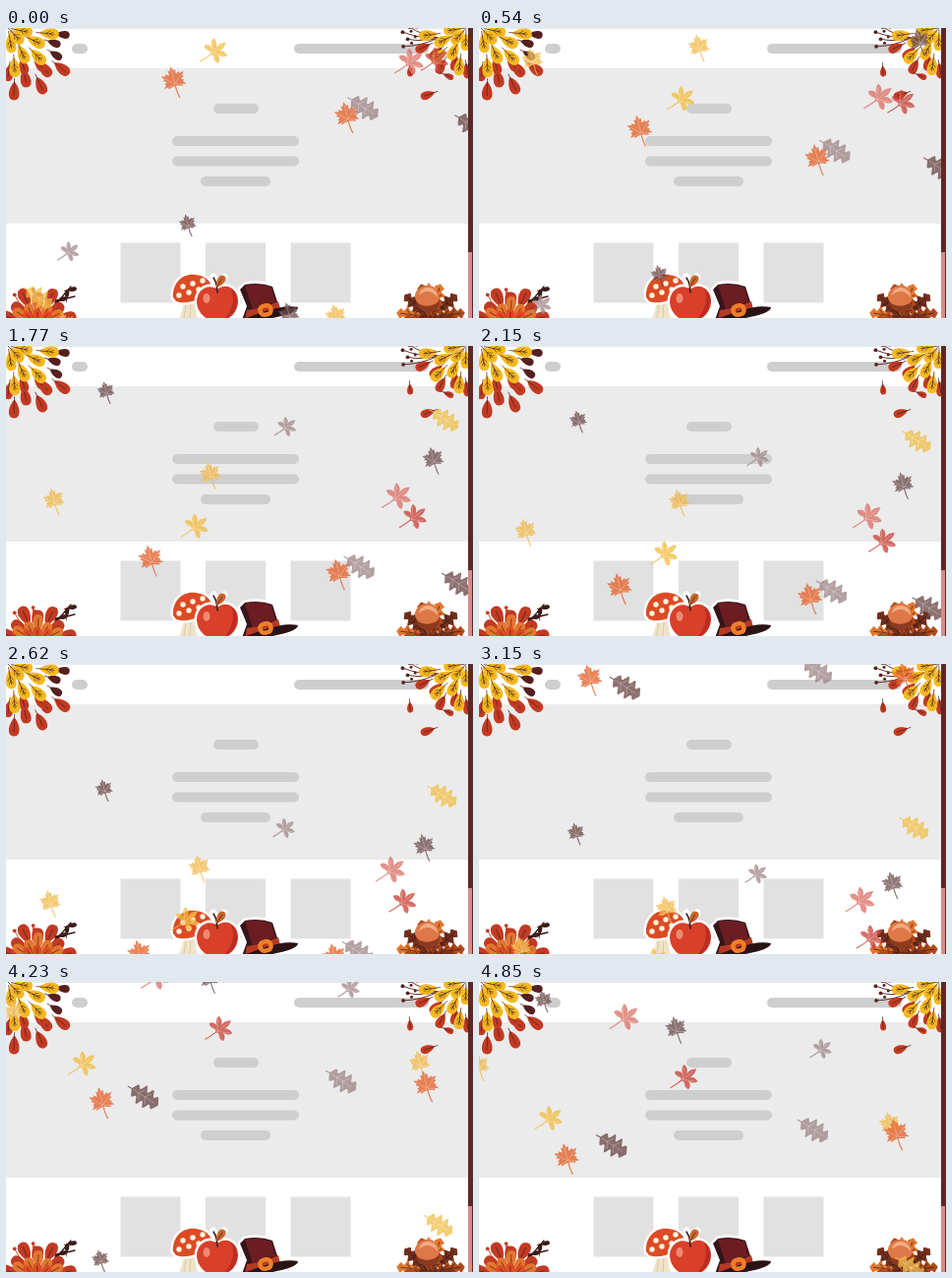
These frames come from a looping animation (475x295 px, 4.92 s). An HTML page with a canvas:

```html
<!DOCTYPE html>
<html lang="en">
<head>
<meta charset="utf-8">
<title>Autumn leaves</title>
<style>
html, body { margin: 0; width: 100%; height: 100%; overflow: hidden; background: #fff; }
canvas { display: block; }
</style>
</head>
<body>
<canvas id="stage" width="475" height="295"></canvas>
<script>
const W = 475, H = 295, LOOP = 4920, STEPS = 64;
const stage = document.getElementById('stage').getContext('2d');

const RED = '#c23a23', BRICK = '#dc4b25', YELLOW = '#f5b921', MAROON = '#56201f';
const ORANGE = '#e2762f', RUST = '#b04a1c', INK = '#351a18';

function fill(c, d, color) {
  c.fillStyle = color;
  c.fill(new Path2D(d));
}

function line(c, d, color, width = 1) {
  c.strokeStyle = color;
  c.lineWidth = width;
  c.lineCap = c.lineJoin = 'round';
  c.stroke(new Path2D(d));
}

function dot(c, x, y, r, color, ry = r) {
  c.fillStyle = color;
  c.beginPath();
  c.ellipse(x, y, r, ry, 0, 0, 7);
  c.fill();
}

function pill(c, x, y, w) {
  c.fillStyle = '#cecece';
  c.beginPath();
  c.roundRect(x, y, w, 10, 5);
  c.fill();
}

// ---- Falling leaves -------------------------------------------------------

// Angles are measured clockwise from straight up.
const polar = (angle, r) => `${Math.sin(angle) * r} ${-Math.cos(angle) * r}`;

// Five lobes around a centre; "lobe" gives the segments of one.
function lobed(spread, lobe) {
  let d = 'M0 .3';
  for (let i = -2; i <= 2; i++) d += lobe(i * spread, 1 - 0.09 * Math.abs(i));
  return new Path2D(d + 'Z');
}

const toothedLobe = (a, r) => [[-.46, .5], [-.32, .8 * r], [-.19, .7 * r], [0, r], [.19, .7 * r], [.32, .8 * r], [.46, .5]]
  .map(([turn, radius]) => 'L' + polar(a + turn, radius)).join('');

const smoothLobe = (a, r) =>
  `L${polar(a - .48, .32)}Q${polar(a - .42, .68)} ${polar(a, r)}Q${polar(a + .42, .68)} ${polar(a + .48, .32)}`;

function wavyOutline() {
  const side = [];
  for (let u = 0; u <= 1; u += 0.025) {
    const width = 0.66 * Math.sin(Math.PI * u) ** 0.5 * (0.72 - 0.28 * Math.cos(u * 8 * Math.PI));
    side.push([width, u * 1.9 - 1]);
  }
  const other = side.map(([x, y]) => [-x, y]).reverse();
  return new Path2D('M' + side.concat(other).map(p => p.join(' ')).join('L') + 'Z');
}

const palmVeins = new Path2D('M0 .2V-.75M0 .2L.6-.35M0 .2L-.6-.35M0 .2L.6.35M0 .2L-.6.35');
const featherVeins = new Path2D('M0 .8V-.7M0 .4l.35-.25M0 .4l-.35-.25M0-.05l.35-.25M0-.05l-.35-.25');

const SHAPES = {
  maple: { path: lobed(1, toothedLobe), veins: palmVeins, stem: new Path2D('M0 .2Q0 .8 .1 1.15') },
  star: { path: lobed(.96, smoothLobe), veins: palmVeins, stem: new Path2D('M0 .2Q0 .7 -.08 1.2') },
  oak: { path: wavyOutline(), veins: featherVeins, stem: new Path2D('M0 .8L.03 1.15') }
};

const TURN = { maple: -.25, star: .9, oak: 2.15 };

// A leaf starts at height y, falls at its speed and re-enters above the page in its next lane.
const leaf = (shape, color, size, y, speed, drift, ...lanes) => ({ shape, color, size, y, speed, drift, lanes });
const TOP = -14, SPAN = 323;
const LEAVES = [
  leaf('oak', '#9d8385', 17, 81, 81, -2.2, 364, 351),
  leaf('oak', '#694645', 17, 99, 80.5, -7.7, 473, 173),
  leaf('oak', '#f1bf4a', 16, 274, 70, -2.5, 33, 451),
  leaf('maple', '#f0b84a', 13.5, 302, 101, -4.5, 60, 57, 440),
  leaf('maple', '#f0b84a', 13.5, 294, 90.5, -13, 336, 231, 63),
  leaf('maple', '#e35e28', 15.5, 54, 92.5, -13.3, 171, 154),
  leaf('maple', '#e35e28', 15.5, 90, 80, -4.8, 347, 448),
  leaf('maple', '#694445', 11, 200, 96, -2.3, 185, 106, 77),
  leaf('maple', '#6d4c4e', 13.5, 292, 83, -10.8, 288, 454, 253),
  leaf('star', '#f2ba3c', 15, 24, 90.5, -11, 212, 125),
  leaf('star', '#9f8588', 12, 228, 100.5, -1.8, 64, 288, 357),
  leaf('star', '#da6f62', 16, 35, 67, -7.3, 411, 184),
  leaf('star', '#c84034', 15, 33, 80, -12.5, 437, 270)
];

function drawLeaf(c, { shape, color, size, y, speed, drift, lanes }, t) {
  const { path, veins, stem } = SHAPES[shape];
  const fallen = y + speed * t - TOP;
  const lane = Math.floor(fallen / SPAN);
  c.save();
  c.translate(lanes[lane] + drift * t, TOP + fallen % SPAN);
  c.rotate(TURN[shape]);
  c.scale(size, size);
  c.globalAlpha = 0.76;
  c.fillStyle = c.strokeStyle = color;
  c.fill(path);
  c.lineWidth = 1.2 / size;
  c.stroke(stem);
  c.globalAlpha = 0.35;
  c.strokeStyle = '#fff';
  c.lineWidth = 0.7 / size;
  c.stroke(veins);
  c.restore();
}

// ---- Page and corner foliage ----------------------------------------------

function page(c) {
  c.fillStyle = '#fff';
  c.fillRect(0, 0, W, H);
  c.fillStyle = '#e9e9e9';
  c.fillRect(0, 0, 470, 1);
  c.fillStyle = '#ebebeb';
  c.fillRect(0, 41, 470, 158);
  pill(c, 67, 16, 16);
  pill(c, 293, 16, 137);
  pill(c, 211, 77, 46);
  pill(c, 169, 110, 129);
  pill(c, 169, 130.5, 129);
  pill(c, 198, 151, 71);
  c.fillStyle = '#e1e1e1';
  for (let i = 0; i < 3; i++) c.fillRect(116.5 + i * 86.5, 218.5, 61, 61);
}

// Rounded leaf hanging from a narrow base; angle zero points right.
function petal(c, x, y, length, angle, color, width = length * 0.5) {
  const h = length / 2, w = width * 0.66;
  c.save();
  c.translate(x, y);
  c.rotate(angle);
  fill(c, `M${-h} 0C${-h * .3} ${-w} ${h} ${-w * 1.25} ${h} 0C${h} ${w * 1.25} ${-h * .3} ${w} ${-h} 0Z`, color);
  line(c, `M${-h - 3} 0H${h * .5}`, MAROON, 0.7);
  if (color === YELLOW) line(c, 'M-3 0l4 -3M-3 0l4 3M1 0l3 -2M1 0l3 2', INK, 0.5);
  c.restore();
}

// Petals spread evenly between two angles, alternating between two distances.
function fan(c, cx, cy, from, to, count, near, far, length, color) {
  for (let i = 0; i < count; i++) {
    const angle = from + (to - from) * i / (count - 1);
    const r = i % 2 ? near : far;
    petal(c, cx + Math.cos(angle) * r, cy + Math.sin(angle) * r, length, angle, color);
  }
}

// Thin branches with a berry at each end and one halfway.
function twigs(c, cx, cy, from, to, count, length, color) {
  for (let i = 0; i < count; i++) {
    const angle = from + (to - from) * i / (count - 1);
    const r = length * (i % 2 ? 0.85 : 1);
    const x = Math.cos(angle) * r, y = Math.sin(angle) * r;
    line(c, `M${cx} ${cy}q${x * .5} ${y * .5 + 4} ${x} ${y}`, color, 0.9);
    dot(c, cx + x, cy + y, 1.9, color);
    dot(c, cx + x * .82 + 2, cy + y * .82 - 2, 1.5, color);
  }
}

function topCorner(c) {
  fan(c, 10, 5, 1.6, .66, 5, 47, 59, 19, RED);
  fan(c, 8, 4, 1.7, .9, 3, 36, 42, 17, RED);
  fan(c, 10, 2, .56, .1, 3, 41, 48, 14, MAROON);
  fan(c, 6, 2, 1.5, .1, 5, 27, 38, 20, YELLOW);
  fan(c, 2, 0, 1.4, .2, 3, 12, 16, 19, YELLOW);
}

function topRight(c) {
  twigs(c, 440, 10, 2.9, 3.5, 4, 37, MAROON);
  fan(c, 462, 2, 1.4, 2.7, 5, 34, 42, 16, RED);
  fan(c, 466, 2, 1.7, 3, 5, 24, 37, 19, YELLOW);
  fan(c, 468, 0, 1.6, 3, 3, 12, 14, 18, YELLOW);
  petal(c, 411, 44, 11, 1.5, RED);
  petal(c, 450, 49, 11, .4, RED);
  petal(c, 429, 68, 15, 2.8, RED);
}

function bottomLeft(c) {
  twigs(c, 26, 296, 4.1, 5.1, 4, 30, RED);
  line(c, 'M42 294Q50 281 66 263M50 282L51 267M54 277L70 273', INK, 1.3);
  for (let i = 0; i < 4; i++) petal(c, 52 + i * 5, 281 - i * 5, 10, i % 2 ? -.2 : -1.5, INK, 4);
  fan(c, 32, 302, 3.4, 6.05, 7, 23, 30, 21, RED);
  fan(c, 32, 302, 3.7, 5.8, 5, 15, 20, 18, ORANGE);
  fan(c, 32, 302, 3.9, 5.5, 3, 9, 11, 15, BRICK);
}

function oakFan(c, cx, cy, radius, count, colors) {
  const { path, veins } = SHAPES.oak;
  for (let i = 0; i < count; i++) {
    c.save();
    c.translate(cx, cy);
    c.rotate(-1.45 + 2.9 * i / (count - 1));
    c.translate(0, -radius);
    c.scale(12, 15);
    c.fillStyle = colors[i % colors.length];
    c.fill(path);
    c.strokeStyle = INK;
    c.lineWidth = 0.05;
    c.stroke(veins);
    c.restore();
  }
}

function bottomRight(c) {
  oakFan(c, 432, 294, 20, 6, [ORANGE, '#74301d', RUST]);
  oakFan(c, 430, 298, 10, 4, [RUST, '#74301d']);
  fill(c, 'M416 275C415 267 421 263 428 262L430 259L432 262C440 265 442 271 440 277C435 288 421 287 416 275Z', '#de7846');
  fill(c, 'M420 272C421 266 425 264 430 264C436 265 439 269 439 274C432 266 426 267 420 272Z', '#f2ab80');
  fill(c, 'M417 279Q429 287 441 278Q441 288 430 290Q419 288 417 279Z', '#8c3a20');
}

// ---- Bottom stickers --------------------------------------------------------

function sticker(c, d, color) {
  line(c, d, '#fff', 5);
  fill(c, d, color);
}

function mushroom(c) {
  sticker(c, 'M180 277L195 273Q190 286 196 297L175 297Q181 287 180 277Z', '#efe3c9');
  line(c, 'M183 281L181 295M188 280L187 295', '#d5c3a0', 0.8);
  sticker(c, 'M170 274C169 258 181 249 193 251C204 252 211 260 209 267C200 276 184 282 173 278Z', BRICK);
  for (let i = 0; i < 6; i++) dot(c, 180 + i % 3 * 10 - (i > 2) * 4, 263 - i % 3 * 3 + (i > 2) * 9, 2.7, '#fff3dc');
}

function hat(c) {
  const brim = 'M237 297C258 291 279 280 297 284C297 290 281 293 262 297Z';
  line(c, brim, '#fff', 5);
  sticker(c, 'M238 266L243 261Q258 258 271 263L278 285L268 296L240 297L245 283Z', '#35151a');
  fill(c, 'M243 262Q258 259 270 264L274 279Q262 281 251 287Z', '#6b1d22');
  fill(c, 'M245 287Q262 285 277 278L279 286Q264 294 243 297Z', '#b53a25');
  fill(c, brim, '#2b1215');
  c.save();
  c.translate(264, 287);
  c.rotate(-.2);
  c.lineWidth = 4.5;
  c.strokeStyle = '#ef7f27';
  c.beginPath();
  c.roundRect(-5.5, -4.5, 11, 9, 4);
  c.stroke();
  c.restore();
}

function apple(c) {
  line(c, 'M215 267Q214 258 211 253M215 262L222 253', '#fff', 7);
  sticker(c, 'M215 266C224 258 237 266 236 279C235 291 226 298 215 298C203 298 195 290 194 279C194 266 206 259 215 266Z', '#d8402a');
  fill(c, 'M229 265C239 271 237 293 221 297C231 287 233 275 229 265Z', '#bd2c22');
  dot(c, 204, 275, 3.5, '#ee8a72', 5);
  line(c, 'M215 269Q215 260 211 254', INK, 1.5);
  petal(c, 218, 258, 14, -1, '#c66629');
}

const backdrop = document.createElement('canvas');
backdrop.width = W;
backdrop.height = H;
const back = backdrop.getContext('2d');
[page, topCorner, topRight, bottomLeft, bottomRight, mushroom, hat, apple].forEach(paint => paint(back));

function scrollbar(c) {
  c.fillStyle = '#5b2925';
  c.fillRect(470, 0, 5, H);
  c.fillStyle = '#d58d8b';
  c.fillRect(470, 228, 4, 67);
}

function render(now) {
  const step = Math.floor((now % LOOP) / LOOP * STEPS);
  const t = step * LOOP / STEPS / 1000;
  stage.drawImage(backdrop, 0, 0);
  LEAVES.forEach(item => drawLeaf(stage, item, t));
  scrollbar(stage);
}

const start = performance.now();
function tick() {
  render(performance.now() - start);
  requestAnimationFrame(tick);
}
tick();
</script>
</body>
</html>
```
